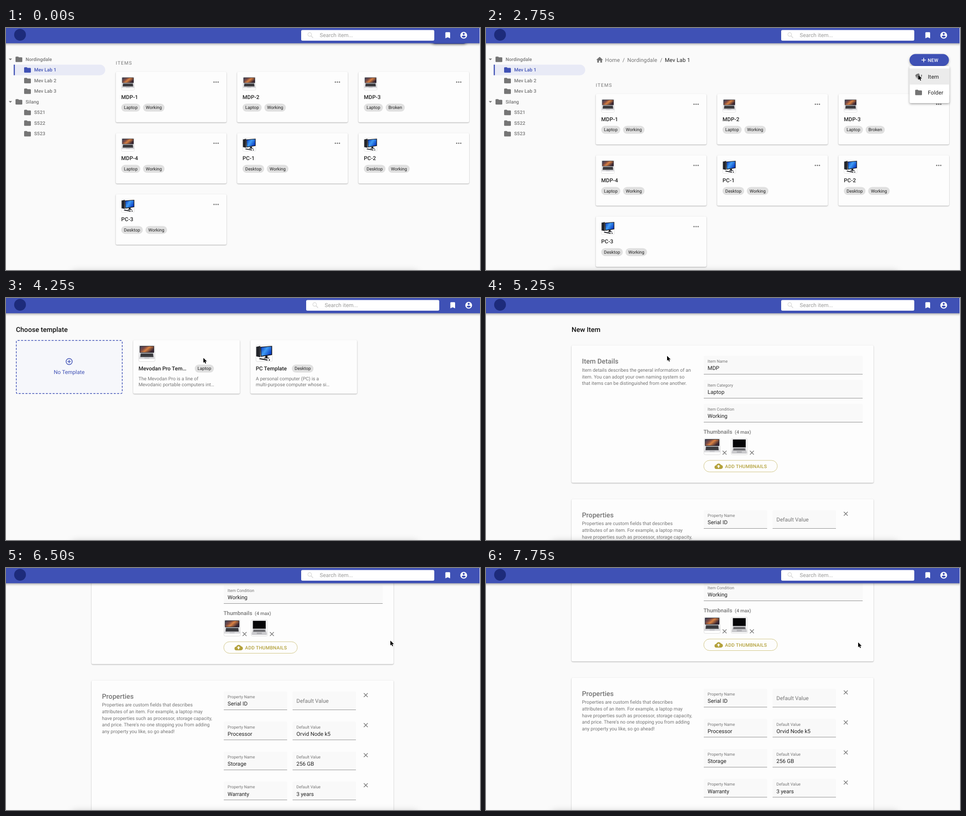
Animation of 1047 by 535 pixels, one loop 8 s. Source, as an HTML page:

```html
<!DOCTYPE html>
<html lang="en">
<head>
<meta charset="utf-8">
<title>Inventory</title>
<style>
  html, body { margin: 0; width: 100%; height: 100%; overflow: hidden; background: #fafafa; }
  svg { display: block; width: 1047px; height: 535px; font-family: Roboto, sans-serif; text-rendering: geometricPrecision; }
  .card { fill: #fdfdfd; filter: drop-shadow(0 1px 1px rgba(0,0,0,.32)); }
  .raised { filter: drop-shadow(0 2px 2.5px rgba(0,0,0,.35)); }
  .m { font-weight: 500; }
</style>
</head>
<body>
<svg id="stage" viewBox="0 0 1047 535">
  <defs>
    <linearGradient id="wall" x2="1" y2=".5">
      <stop stop-color="#39435c"/><stop offset=".35" stop-color="#7b4a44"/>
      <stop offset=".6" stop-color="#d98142"/><stop offset="1" stop-color="#3a2733"/>
    </linearGradient>
    <linearGradient id="blue" x2="1" y2=".6">
      <stop stop-color="#0a35b8"/><stop offset=".5" stop-color="#3f9df5"/><stop offset="1" stop-color="#0b3fc4"/>
    </linearGradient>
    <path id="folder" d="M-6-6h4.5l1.5 1.5h6q1.5 0 1.5 1.5v7.5q0 1.5-1.5 1.5h-12q-1.5 0-1.5-1.5v-9q0-1.5 1.5-1.5z"/>
    <path id="close" d="M-4.3-4.3l8.6 8.6m0-8.6l-8.6 8.6" fill="none" stroke="#757575" stroke-width="1.4"/>
    <g id="dots" fill="#757575"><circle cx="-4.5" r="1.5"/><circle r="1.5"/><circle cx="4.5" r="1.5"/></g>
    <rect id="frame" x=".5" y=".5" width="36" height="36" rx="3" fill="#fff" stroke="#dcdcdc"/>
    <path id="base" d="M2.5 17h32l1.5 13q0 1-1 1H2q-1 0-1-1z" fill="#d9d9dc"/>
    <g id="laptop">
      <use href="#frame"/><use href="#base"/>
      <rect x="2.5" y="2" width="32" height="15" rx="1" fill="#181820"/>
      <rect x="3.5" y="3" width="30" height="13" fill="url(#wall)"/>
      <path d="M5 18.5h27l1 8H4z" fill="#3a3a3e"/>
      <path d="M13 27.5h11v3H13z" fill="#c6c6ca"/>
    </g>
    <g id="dark">
      <use href="#frame"/>
      <path d="M4 21h29l2.5 11q0 2-1.5 2H3q-1.500 0-1.500-2z" fill="#c9c9cc"/>
      <rect x="3.500" y="2" width="30" height="19" rx="1" fill="#b8b8bc"/>
      <rect x="4.500" y="3" width="28" height="17" fill="#060608"/>
      <path d="M6 22.500h25l1 4.500H5z" fill="#66666a"/>
      <path d="M13 28.500h11v3.500H13z" fill="#adadb1"/>
    </g>
    <g id="pc">
      <use href="#frame"/>
      <path d="M1 4l9-2v25l-9-2z" fill="#23252b"/>
      <path d="M10 4l26-2v20l-25 4z" fill="#101218"/>
      <path d="M11.500 5.300l23-1.800v17l-22 3.500z" fill="url(#blue)"/>
      <path d="M21 24h5v4h4v1.500H18V28h3zM9 29l17 3v2.500L7 31z" fill="#17181d"/>
      <circle cx="30" cy="33" r="1.500" fill="#17181d"/>
    </g>
  </defs>
</svg>
<script>
const BLUE = '#3f51b5', GREY = '#757575', INK = '#212121';
const measure = document.createElement('canvas').getContext('2d');

// y is the middle of the capital letters
const text = (x, y, size, str, fill = GREY, cls = '', spacing = 0) =>
  `<text x="${x}" y="${y + size * .356}" font-size="${size}" fill="${fill}" class="${cls}" letter-spacing="${spacing}">${str}</text>`;
const rect = (x, y, w, h, r, attrs) => `<rect x="${x}" y="${y}" width="${w}" height="${h}" rx="${r}" ${attrs}/>`;
const card = (x, y, w, h) => rect(x, y, w, h, 3, 'class="card"');
const use = (id, x, y, scale = 1, fill = GREY) =>
  `<use href="#${id}" transform="translate(${x} ${y}) scale(${scale})" fill="${fill}"/>`;
const line = (d, color, width) => `<path d="${d}" fill="none" stroke="${color}" stroke-width="${width}"/>`;
const lines = (x, y, step, rows) => rows.map((row, i) => text(x, y + i * step, 10.5, row)).join('');

function chips(x, y, labels) {
  measure.font = '9.75px Roboto, sans-serif';
  return labels.map(label => {
    const w = measure.measureText(label).width + 12;
    const out = rect(x, y - 8.75, w, 17.5, 8.75, 'fill="#e0e0e0"') + text(x + 6, y, 9.75, label, INK);
    x += w + 6;
    return out;
  }).join('');
}

function sidebar() {
  const rows = ['Nordingdale', 'Mev Lab 1', 'Mev Lab 2', 'Mev Lab 3', 'Silang', 'S521', 'S522', 'S523'];
  return `<path d="M17 81h190.500a11.700 11.700 0 0 1 0 23.400H17z" fill="#e8eaf6"/>` +
    rect(17, 81, 2.5, 23.4, 0, `fill="${BLUE}"`) +
    rows.map((name, i) => {
      const y = 69.2 + i * 23.5, parent = i % 4 === 0, x = parent ? 28.5 : 47.5, color = i === 1 ? BLUE : GREY;
      return (parent ? `<path d="M6 ${y - 1.7}h7.400l-3.700 3.700z" fill="${GREY}"/>` : '') +
        use('folder', x, y, 1, color) + text(x + 14.7, y, 10.5, name, color, 'm', .08);
    }).join('');
}

function itemCard([name, kind, state], i) {
  const x = 242.5 + i % 3 * 268, y = 146 + Math.floor(i / 3) * 135.2;
  return card(x, y, 244.5, 111.5) +
    use(kind === 'Laptop' ? 'laptop' : 'pc', x + 12, y + 11, .8) + use('dots', x + 221.5, y + 22.5) +
    text(x + 12, y + 55.3, 12, name, INK, 'm', .09) + chips(x + 12, y + 79, [kind, state]);
}

function listPage() {
  const items = [1, 2, 3, 4].map(n => ['MDP-' + n, 'Laptop', n === 3 ? 'Broken' : 'Working'])
    .concat([1, 2, 3].map(n => ['PC-' + n, 'Desktop', 'Working']));
  return sidebar() + `<g id="items">
    <path d="M249.500 76.500V72h3v4.500h3.800v-6h2.200L251 63.700l-7.500 6.800h2.200v6z" fill="${GREY}"/>` +
    text(263, 70.7, 12, 'Home', GREY, '', .11) + text(301.5, 70.7, 12, '/') +
    text(312, 70.7, 12, 'Nordingdale', GREY, '', .11) + text(384.5, 70.7, 12, '/') +
    text(395, 70.7, 12, 'Mev Lab 1', INK, '', .11) +
    rect(935.5, 57.5, 87, 26.5, 13.25, `fill="${BLUE}" class="raised"`) +
    line('M962 70.800h9.500m-4.750-4.750v9.500', '#fff', 1.5) + text(975.7, 71, 10.5, 'NEW', '#fff', 'm', .3) +
    text(242.5, 126.7, 10.5, 'ITEMS', GREY, '', 1.25) + items.map(itemCard).join('') + '</g>' +
    '<g id="menu">' + rect(935.5, 84, 88, 82, 3, 'fill="#fff" class="raised"') +
    '<g id="hover">' + rect(935.5, 89.5, 88, 35.5, 0, 'fill="#ebebeb"') + '</g>' +
    `<g fill="${GREY}"><path d="M948 104l3-1v9z"/><rect x="951.500" y="101" width="7" height="12" rx="1" transform="rotate(-18 955 107)"/><path d="M961 103l2.500 1-2.500 7z"/></g>` +
    text(976, 107.3, 12, 'Item', INK, '', .1) + use('folder', 955.5, 142.5) + text(976, 142.3, 12, 'Folder', INK, '', .1) + '</g>';
}

function templateCard(x, icon, title, chipX, chip, rows) {
  return card(x, 93, 235.5, 118.5) + use(icon, x + 11.7, 104) +
    text(x + 11.7, 156, 12, title, INK, 'm') + chips(chipX, 156, [chip]) + lines(x + 11.7, 178.3, 13.3, rows);
}

const pickPage = () => text(22, 69.3, 15, 'Choose template', '#111', 'm') +
  rect(22.7, 93.7, 234, 117.6, 3, `fill="#f6f7fb" stroke="${BLUE}" stroke-width="1.5" stroke-dasharray="4.500 3"`) +
  `<circle cx="139.500" cy="140.500" r="6.800" fill="none" stroke="${BLUE}" stroke-width="1.500"/>` +
  line('M135.700 140.500h7.600m-3.800-3.800v7.600', BLUE, 1.5) + text(105.5, 163.8, 12, 'No Template', BLUE) +
  templateCard(281, 'laptop', 'Mevodan Pro Tem…', 417, 'Laptop',
    ['The Mevodan Pro is a line of', 'Mevodanic portable computers int…']) +
  templateCard(540, 'pc', 'PC Template', 631.5, 'Desktop',
    ['A personal computer (PC) is a', 'multi-purpose computer whose si…']) +
  rect(281, 93, 235.5, 118.5, 3, 'id="press" fill="rgba(0,0,0,.04)"');

// y is the underline of the field
const field = (x, y, w, label, value) => rect(x, y - 40.5, w, 40.5, 3, 'fill="#f9f9f9"') +
  line(`M${x} ${y}h${w}`, '#8c8c8c', 1) +
  (value ? text(x + 8.5, y - 28.5, 9, label) + text(x + 8.5, y - 13.3, 12, value, INK) : text(x + 8.5, y - 20, 12, label));

const formPage = () => text(189, 69.3, 15, 'New Item', '#111', 'm') +
  card(189, 104.5, 667, 304) + text(212, 140, 15, 'Item Details', GREY, 'm') +
  lines(212, 159.3, 14.7, ['Item details describes the general information of an',
    'item. You can adopt your own naming system so', 'that items can be distinguished from one another.']) +
  [['Name', 'MDP'], ['Category', 'Laptop'], ['Condition', 'Working']]
    .map(([name, value], i) => field(481, 168.5 + i * 53, 351, 'Item ' + name, value)).join('') +
  text(480.5, 295.7, 12, 'Thumbnails', GREY, 'm') + text(549.5, 296, 10.5, '(4 max)', GREY, 'm') +
  use('laptop', 481, 310) + use('close', 527, 342) + use('dark', 541, 310) + use('close', 587.3, 342) +
  rect(481, 359, 162.5, 25.5, 12.75, 'fill="none" stroke="#d0c583"') +
  '<path d="M509 378a4 4 0 0 1-.500-8a5.700 5.700 0 0 1 10.500-1a4.500 4.500 0 0 1-.500 9z" fill="#b3a13b"/>' +
  '<path d="M512.300 375.500v-3h-2.300l3.700-3.800 3.700 3.800h-2.300v3z" fill="#fdfdfd"/>' +
  text(528, 372, 10.5, 'ADD THUMBNAILS', '#b3a13b', 'm', .25) +
  card(189, 444.5, 667, 400) + text(212, 479.5, 15, 'Properties', GREY, 'm') +
  lines(212, 498.5, 14.7, ['Properties are custom fields that describes', 'attributes of an item. For example, a laptop may',
    'have properties such as processor, storage capacity,', "and price. There's no one stopping you from adding",
    'any property you like, so go ahead!']) +
  [['Serial ID'], ['Processor', 'Orvid Node k5'], ['Storage', '256 GB'], ['Warranty', '3 years']].map(([name, value], i) => {
    const y = 509.5 + i * 66.4;
    return field(481, y, 140, 'Property Name', name) + field(633, y, 140, 'Default Value', value) + use('close', 794.7, y - 32.5);
  }).join('');

const header = () => rect(-5, -5, 1057, 38.7, 0, `fill="${BLUE}" class="raised"`) +
  '<circle cx="31" cy="15" r="13" fill="#1d2b7b"/><g id="tools">' +
  rect(652, 4.5, 294, 23.5, 3, 'fill="#fff"') +
  '<circle cx="670.800" cy="14.300" r="4" fill="none" stroke="#dadada" stroke-width="1.500"/>' + line('M673.700 17.200l4.600 4.600', '#dadada', 1.8) +
  text(693, 16.2, 12, 'Search item...', '#999') +
  '<path d="M972 9.300h7.500q1.500 0 1.500 1.500v12l-5.250-2.250-5.250 2.250v-12q0-1.500 1.500-1.500z" fill="#fff"/>' +
  `<circle cx="1011" cy="16" r="7.500" fill="#fff"/><g fill="${BLUE}"><circle cx="1011" cy="13" r="2.250"/>
   <path d="M1006.500 19c0-1.500 3-2.300 4.500-2.300s4.500.800 4.500 2.300a5.400 5.400 0 0 1-9 0z"/></g></g>`;

const stage = document.getElementById('stage');
stage.insertAdjacentHTML('beforeend',
  `<rect width="1047" height="535" fill="#fafafa"/><g id="list">${listPage()}</g><g id="pick">${pickPage()}</g><g id="form">${formPage()}</g>` +
  rect(145, 539, 765, 40, 8, 'fill="rgba(0,0,0,.25)" style="filter:blur(8px)"') + header() +
  rect(1046, 0, 1, 535, 0, 'id="edge" fill="#f4f4f8"') +
  '<path id="cursor" d="M0 0v10.800l2.500-2.300 1.700 4 1.800-.800-1.700-3.900h3.500z" stroke="#fff" stroke-width="1" paint-order="stroke"/>');

const $ = id => document.getElementById(id);
const show = (id, on) => $(id).setAttribute('visibility', on ? 'visible' : 'hidden');
const move = (id, x, y) => $(id).setAttribute('transform', `translate(${x} ${y})`);

// Each track holds [start time, ...values]; values change in hard steps.
const at = (track, t) => track.findLast(step => step[0] <= t).slice(1);
const scenes = [[0, 'list'], [3000, ''], [3250, 'pick'], [5000, ''], [5250, 'form']];
const scroll = [[0, 49], [1500, 0], [6500, 196], [7250, 199], [7500, 202]];
const pointer = [[0, -50, 0], [500, 765, 94], [750, 622, 89], [1000, 617, 78], [1500, 710.5, 84.5], [1750, 890, 127],
  [2000, 950, 88], [2250, 950, 84], [2750, 955, 104], [4250, 436, 132.5], [4500, 400, 128],
  [5750, 447, 129], [6000, 824, 159], [6250, 849, 160.5], [7750, 822, 164.5]];

function draw() {
  const t = performance.now() % 8000;
  const [scene] = at(scenes, t), [offset] = at(scroll, t), wide = t >= 3000 && t < 5250;
  for (const id of ['list', 'pick', 'form']) $(id).style.display = id === scene ? '' : 'none';
  move('items', 0, -offset);
  move('form', 0, -offset);
  move('tools', wide ? 11 : 0, 0);
  move('cursor', ...at(pointer, t));
  show('edge', !wide);
  show('menu', t >= 2500);
  $('menu').setAttribute('opacity', t < 2750 ? .7 : 1);
  show('hover', t >= 2750);
  show('press', t >= 4500);
  requestAnimationFrame(draw);
}
draw();
</script>
</body>
</html>
```
